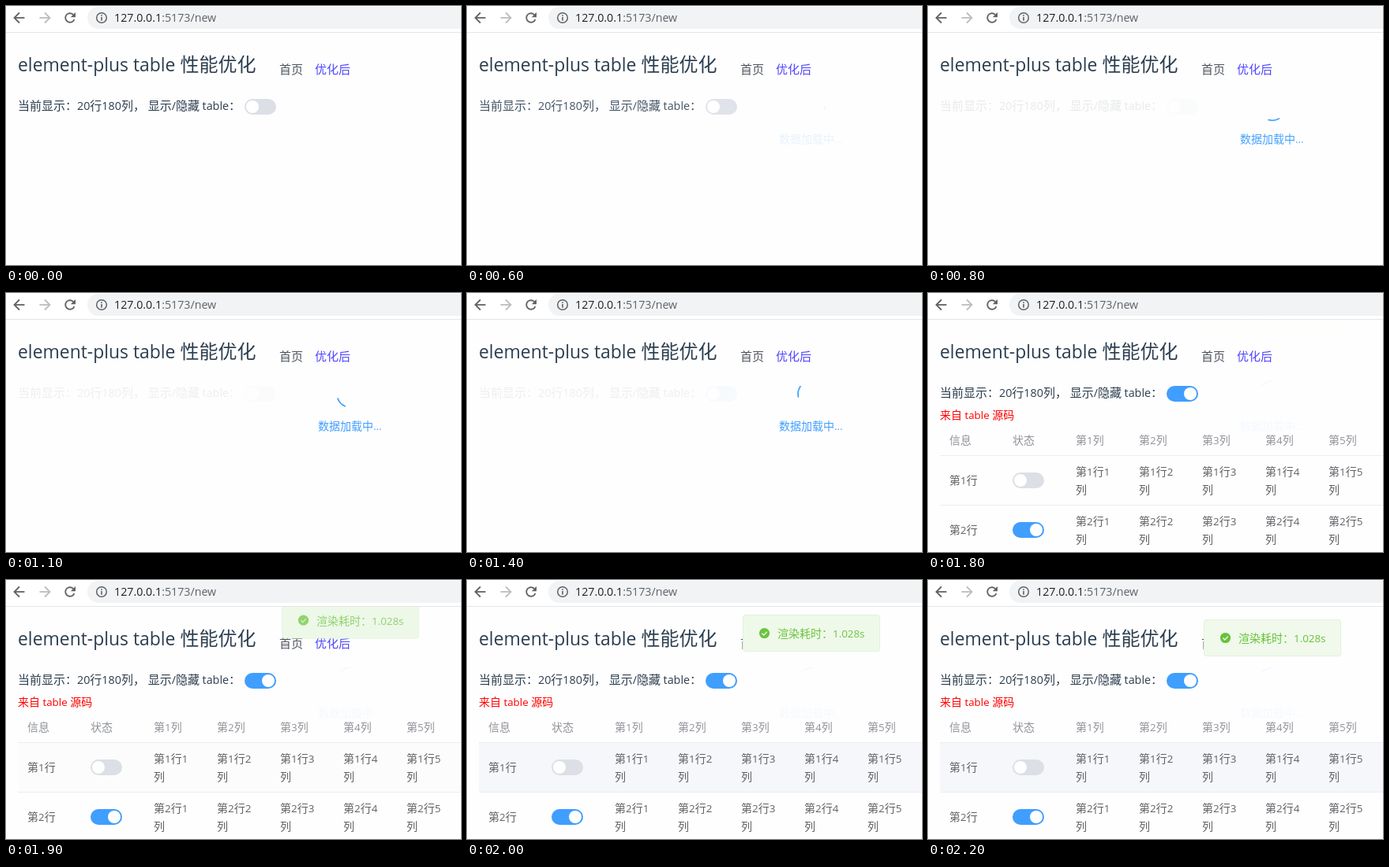
An HTML page with a canvas for the animation above (3200 ms loop, 576 by 329 pixels).

```html
<!DOCTYPE html>
<html lang="zh-CN">
<head>
<meta charset="utf-8">
<title>table</title>
<style>
html, body { margin: 0; width: 100%; height: 100%; overflow: hidden; background: #fefefe; }
canvas { display: block; }
</style>
</head>
<body>
<canvas id="stage" width="576" height="329"></canvas>
<script>
const ctx = document.getElementById('stage').getContext('2d');
const W = 576, H = 329, LOOP = 3200, STEP = 100;
const PAGE = '#fefefe', BLUE = '#409eff', GREEN = '#67c23a', INK = '#2c3e50', GREY = '#606266';
const OFF = '#dcdfe6', TURNING = '#a6c8f0';
const LATIN = '"Open Sans", "Noto Sans", sans-serif';
const HAN = '"Noto Sans CJK SC", "Noto Sans CJK", sans-serif';
const TAU = Math.PI * 2;

const clamp = v => Math.min(1, Math.max(0, v));

function bezier(x1, x2, y1, y2) {
  const at = (a, b, s) => 3 * a * s * (1 - s) ** 2 + 3 * b * s * s * (1 - s) + s ** 3;
  return x => {
    x = clamp(x);
    let lo = 0, hi = 1;
    for (let i = 0; i < 24; i++) {
      const mid = (lo + hi) / 2;
      if (at(x1, x2, mid) < x) lo = mid; else hi = mid;
    }
    return at(y1, y2, (lo + hi) / 2);
  };
}
const ease = bezier(0.25, 0.25, 0.1, 1);
const easeInOut = bezier(0.42, 0.58, 0, 1);

// Latin runs are set slightly smaller than the Han runs beside them.
function text(str, x, y, size, color) {
  ctx.fillStyle = color;
  for (const run of str.match(/[\x00-\x7f]+|[^\x00-\x7f]+/g)) {
    const latin = run.charCodeAt(0) < 128;
    ctx.font = latin ? `${size * 0.955}px ${LATIN}` : `${size}px ${HAN}`;
    ctx.fillText(run, x, y);
    x += ctx.measureText(run).width;
  }
  return x;
}

function rect(x, y, w, h, color) {
  ctx.fillStyle = color;
  ctx.fillRect(x, y, w, h);
}

function pill(x, y, w, h, r, color) {
  ctx.fillStyle = color;
  ctx.beginPath();
  ctx.roundRect(x, y, w, h, r);
  ctx.fill();
}

function disc(x, y, r, color) {
  ctx.fillStyle = color;
  ctx.beginPath();
  ctx.arc(x, y, r, 0, TAU);
  ctx.fill();
}

function line(color, width, ...pts) {
  ctx.strokeStyle = color;
  ctx.lineWidth = width;
  ctx.beginPath();
  for (let i = 0; i < pts.length; i += 2) ctx.lineTo(pts[i], pts[i + 1]);
  ctx.stroke();
}

function arc(x, y, r, from, to, color, width) {
  ctx.strokeStyle = color;
  ctx.lineWidth = width;
  ctx.beginPath();
  ctx.arc(x, y, r, from, to);
  ctx.stroke();
}

function faded(alpha, draw) {
  ctx.save();
  ctx.globalAlpha = alpha;
  draw();
  ctx.restore();
}

function toggle(x, y, color, on) {
  pill(x, y, 40, 20, 10, color);
  disc(x + (on ? 30 : 10), y + 10, 8, '#fff');
}

function arrow(x, dir, color) {
  line(color, 1.8, x - 6.5 * dir, 15, x + 6.5 * dir, 15);
  line(color, 1.8, x, 8.5, x + 6.5 * dir, 15, x, 21.5);
}

function toolbar() {
  rect(0, 0, W, 33, '#fff');
  rect(0, 33, W, 1, '#e3e5e8');
  pill(103, 1, 520, 28, 14, '#f1f3f4');
  arrow(17, -1, '#5f6368');
  arrow(49, 1, '#bbbdc0');
  arc(81, 15, 5.8, 0.35, TAU - 0.75, '#5f6368', 1.9);
  ctx.fillStyle = '#5f6368';
  ctx.beginPath();
  ctx.moveTo(88, 8);
  ctx.lineTo(88, 14.2);
  ctx.lineTo(81.8, 14.2);
  ctx.fill();
  arc(121, 15, 6.3, 0, TAU, '#5f6368', 1.5);
  rect(120.2, 14, 1.6, 4.6, '#5f6368');
  rect(120.2, 11.3, 1.6, 1.6, '#5f6368');
  text(':5173/new', text('127.0.0.1', 137, 20, 14.9, '#202124'), 20, 14.9, '#5f6368');
}

function heading() {
  text('element-plus table 性能优化', 15, 83, 24, INK);
  text('首页', 346, 86, 15, '#50565e');
  text('优化后', 391, 86, 15, '#4f46ff');
}

function controls(t) {
  const on = t >= 1700;
  text('当前显示：20行180列， 显示/隐藏 table：', 15, 132, 15, INK);
  toggle(302, 118, on ? BLUE : t >= 1200 ? TURNING : OFF, on);
}

function table(hover) {
  text('来自 table 源码', 15, 160, 14, '#f00');
  if (hover) faded(hover, () => rect(15, 207, W, 62, '#f5f7fa'));
  rect(15, 206, W, 1, '#ebeef5');
  rect(15, 269, W, 1, '#ebeef5');
  text('信息', 27, 192, 14, '#909399');
  text('状态', 107, 192, 14, '#909399');
  for (let c = 1; c <= 5; c++) text(`第${c}列`, 107 + 80 * c, 192, 14, '#909399');
  for (let r = 1; r <= 2; r++) {
    const y = 144 + 63 * r;
    text(`第${r}行`, 27, y + 36, 14, GREY);
    toggle(107, y + 21, r === 2 ? BLUE : OFF, r === 2);
    for (let c = 1; c <= 5; c++) {
      text(`第${r}行${c}`, 107 + 80 * c, y + 25, 14, GREY);
      text('列', 107 + 80 * c, y + 48, 14, GREY);
    }
  }
}

// The dash stalls while the table is being built; the rotation goes on.
function loader(t) {
  const age = Math.max(0, t - 575);
  const p = easeInOut(Math.min(age, 215) / 750);
  const start = age / 2000 * TAU + 2 * p;
  const length = (1 + 89 * p) / 20;
  ctx.lineCap = 'round';
  arc(436, 128.3, 17, start, start + length, BLUE, 1.7);
  ctx.lineCap = 'butt';
  text('数据加载中...', 395, 174, 14, BLUE);
}

function toast(t) {
  const y = 3 + 47 * ease((t - 1790) / 360);
  ctx.save();
  ctx.beginPath();
  ctx.rect(0, 34, W, H);
  ctx.clip();
  ctx.globalAlpha = ease((t - 1790) / 270);
  pill(349, y, 174, 47, 4, '#e1f3d8');
  pill(350, y + 1, 172, 45, 3, '#f0f9eb');
  disc(376.5, y + 23.5, 6.6, GREEN);
  line('#f0f9eb', 1.4, 373.4, y + 23.6, 375.8, y + 26, 379.8, y + 21.6);
  text('渲染耗时：1.028s', 393, y + 29, 14, GREEN);
  ctx.restore();
}

function draw(t) {
  rect(0, 0, W, H, PAGE);
  toolbar();
  heading();
  controls(t);
  if (t >= 1700) table(clamp((t - 1850) / 150));
  if (t >= 600 && t < 1800) {
    const shown = ease((t - 565) / 300);
    faded(shown * 0.92, () => rect(15, 105, W, H, PAGE));
    faded(shown, () => loader(t));
  }
  if (t >= 1800) {
    faded(0.05, () => loader(1700));
    toast(t);
  }
}

const begin = performance.now();
function tick() {
  const t = (performance.now() - begin) % LOOP;
  draw(Math.floor(t / STEP) * STEP);
  requestAnimationFrame(tick);
}
tick();
</script>
</body>
</html>
```
